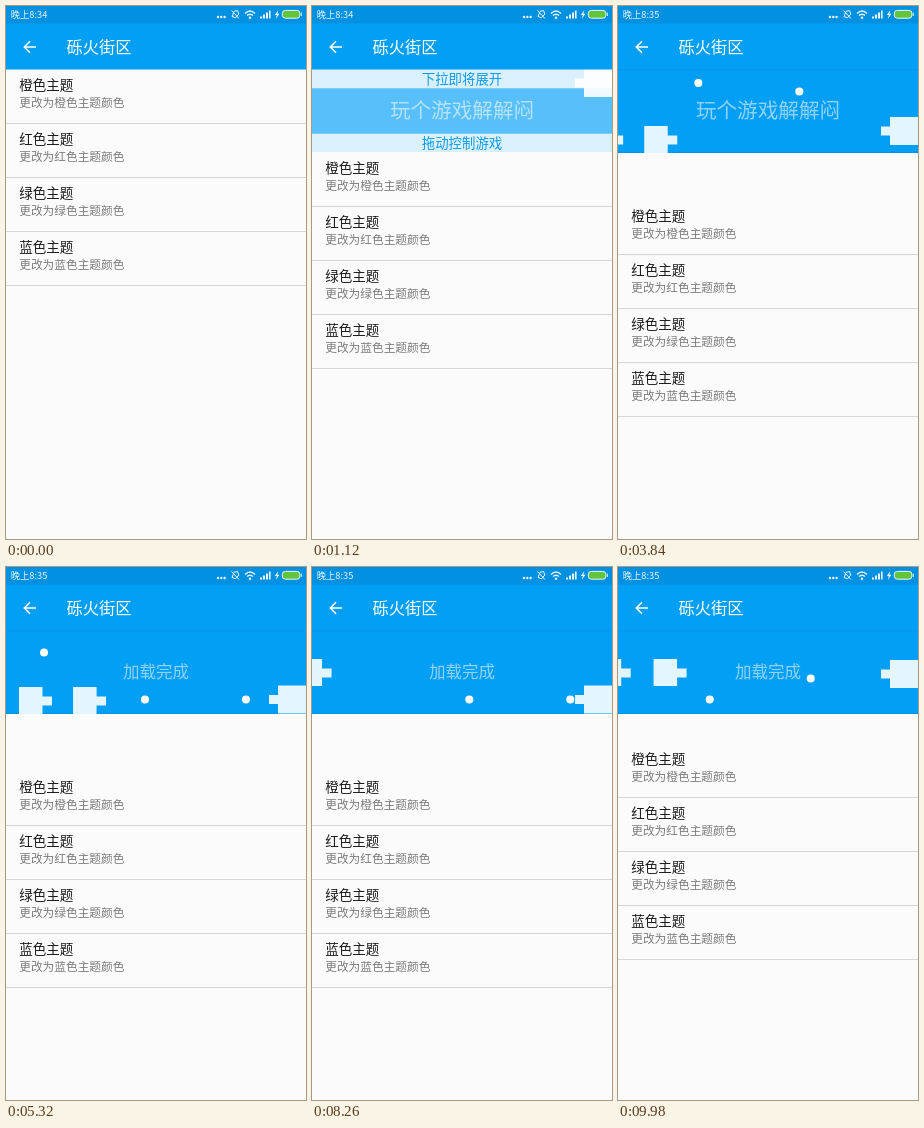
Animation of 300x533 px, one loop 10000 ms. Source, as an HTML page:

```html
<!DOCTYPE html>
<html lang="zh">
<head>
<meta charset="utf-8">
<style>
html, body { margin: 0; width: 100%; height: 100%; overflow: hidden; background: #fbfbfc; }
svg { display: block; width: 100vw; height: 100vh; font-family: "Noto Sans CJK SC", "Noto Sans CJK", "Noto Sans", sans-serif; }
.title { font-size: 13.5px; fill: #1c1c1c; }
.sub { font-size: 11.7px; fill: #7b7b7b; }
.mid { text-anchor: middle; }
.mask { font-size: 13.4px; fill: #0b9bee; }
.mark { fill: #8fd3fc; }
.tank { fill: #e3f5ff; }
</style>
</head>
<body>
<svg viewBox="0 0 300 533">
  <defs>
    <clipPath id="below"><path d="M0 63H300V533H0z"/></clipPath>
    <clipPath id="field"><path d="M0 0H300V84H0z"/></clipPath>
  </defs>

  <g clip-path="url(#below)">
    <g id="header"><g clip-path="url(#field)">
      <rect width="300" height="84" fill="#039ff5"/>
      <path d="M0 .7H300M0 83.6H300" stroke="#0a8ddb" stroke-width=".8"/>
      <text id="hint" class="mid mark" x="150" y="49"></text>
      <g id="enemies" class="tank"></g>
      <path id="player" class="tank" d="M272 0H300V28H272V18.5H263V9.5H272z"/>
      <g id="bullets" fill="#fff"></g>
      <rect id="shade" width="300" height="84" fill="#fff"/>
      <g id="upper">
        <rect width="300" height="42" fill="#fff" opacity=".78"/>
        <text class="mid mask" x="150" y="37.8">下拉即将展开</text>
      </g>
      <g id="lower">
        <rect y="42" width="300" height="42" fill="#fff" opacity=".78"/>
        <text class="mid mask" x="150" y="56">拖动控制游戏</text>
      </g>
    </g></g>
    <g id="list"><rect y="63" width="300" height="600" fill="#fbfbfc"/></g>
  </g>

  <rect width="300" height="63.5" fill="#039ff5"/>
  <rect width="300" height="17.5" fill="#0290e0"/>
  <path d="M30 41H18.6M24 35.3 18.3 41 24 46.7" fill="none" stroke="#fff" stroke-width="1.5"/>
  <text x="60.5" y="46.6" font-size="16.3" fill="#fff">砾火街区</text>
  <text id="clock" x="4.7" y="12.4" font-size="9.3" fill="#e8f6ff"></text>
  <g fill="#e8f6ff">
    <circle cx="212" cy="11" r="1.2"/><circle cx="215.3" cy="11" r="1.2"/><circle cx="218.6" cy="11" r="1.2"/>
    <path d="M254 12.5v-2h2v2zM257 12.5v-4h2v4zM260 12.5v-6h2v6zM263 12.5v-8h1.6v8z"/>
    <path d="M272.3 4 268.8 9h2l-1 4 3.6-5.2h-2z"/>
    <circle cx="244" cy="11.8" r="1.2"/>
  </g>
  <g fill="none" stroke="#e8f6ff">
    <path d="M226 10.5 228.2 5.2 231.6 4.6 232.8 8 229.6 11.8zM225.5 4.5 233 12.5"/>
    <path d="M239 7.4Q244 2.8 249 7.4M241 9.6Q244 6.8 247 9.6" stroke-width="1.4"/>
    <rect x="276.3" y="4.4" width="17.6" height="7.8" rx="3" fill="#62c43a"/>
    <path d="M295.3 6.6V10"/>
  </g>
</svg>
<script>
const LOOP = 10000, BASE = 83;
const $ = id => document.getElementById(id);
const clamp = (v, lo, hi) => Math.min(hi, Math.max(lo, v));
const shift = (el, x, y) => el.setAttribute('transform', `translate(${x} ${y})`);
const show = (el, on) => el.style.display = on ? '' : 'none';

function add(parent, tag, attrs, text) {
  const el = document.createElementNS('http://www.w3.org/2000/svg', tag);
  for (const k in attrs) el.setAttribute(k, attrs[k]);
  if (text) el.textContent = text;
  return parent.appendChild(el);
}

[...'橙红绿蓝'].forEach((c, i) => {
  const y = 63 + i * 54, list = $('list');
  add(list, 'text', { class: 'title', x: 13.2, y: y + 21.3 }, c + '色主题');
  add(list, 'text', { class: 'sub', x: 13.2, y: y + 38 }, `更改为${c}色主题颜色`);
  add(list, 'rect', { y: y + 54, width: 300, height: 1, fill: '#d6d6d7' });
});

// Finger drag: time in ms, list offset in px
const drag = [[0, 0], [60, 0], [230, 95], [400, 156], [480, 115], [580, 91], [700, BASE],
  [2700, BASE], [3000, 90], [3060, 93], [3840, 131], [4060, 141],
  [8260, 141], [9200, 118], [9980, 113], [LOOP, 113]];

function offset(t) {
  const i = Math.max(1, drag.findIndex(k => k[0] >= t));
  const [t0, a] = drag[i - 1], [t1, b] = drag[i];
  return a + (b - a) * (t - t0) / (t1 - t0);
}
const playerY = t => t < 1500 ? 0 : clamp(offset(t) - BASE, 0, 55.5);

const SHOT = 0.0968;
const shots = Array.from({ length: 8 }, (_, k) => {
  const start = 1985 + 1043 * k;
  return { start, end: LOOP, el: add($('bullets'), 'circle', { r: 4, cy: playerY(start) + 14 }) };
});
const shotX = (s, t) => 260 - SHOT * (t - s.start);

const tanks = [2, 2, 2, 1, 1].map((row, i) => ({
  start: 1695 + 1960 * i, end: LOOP, row, speed: i < 2 ? 0.0276 : 0.0285,
  el: add($('enemies'), 'path', { d: 'M0 0H23.5V9.5H33V18.5H23.5V27H0z' })
}));

// The first three tanks each meet a bullet head-on
tanks.slice(0, 3).forEach((tank, i) => {
  const s = shots[i + 2];
  tank.end = s.end = (256 + SHOT * s.start + tank.speed * tank.start) / (SHOT + tank.speed);
});

function draw(t) {
  const off = offset(t);
  shift($('list'), 0, off);
  shift($('header'), 0, t < 700 ? off - 20 : 63);

  const open = (1 - Math.cos(Math.PI * clamp((t - 700) / 800, 0, 1))) / 2;
  shift($('upper'), 0, -42 * open);
  shift($('lower'), 0, 42 * open);
  $('shade').setAttribute('opacity', 0.73 * (1 - open));

  const done = t >= 4500;
  $('hint').textContent = done ? '加载完成' : '玩个游戏解解闷';
  $('hint').setAttribute('font-size', done ? 16.5 : 20.6);
  $('hint').setAttribute('y', done ? 47.5 : 49);
  $('clock').textContent = t < 3400 ? '晚上8:34' : '晚上8:35';

  shift($('player'), 0, playerY(t));
  for (const s of shots) {
    show(s.el, t >= s.start && t < s.end);
    s.el.setAttribute('cx', shotX(s, t));
  }
  for (const k of tanks) {
    show(k.el, t >= k.start && t < k.end);
    shift(k.el, (t - k.start) * k.speed - 33, k.row * 28 + 1);
  }
}

const begin = performance.now();
function tick() {
  draw((performance.now() - begin) % LOOP);
  requestAnimationFrame(tick);
}
tick();
</script>
</body>
</html>
```
